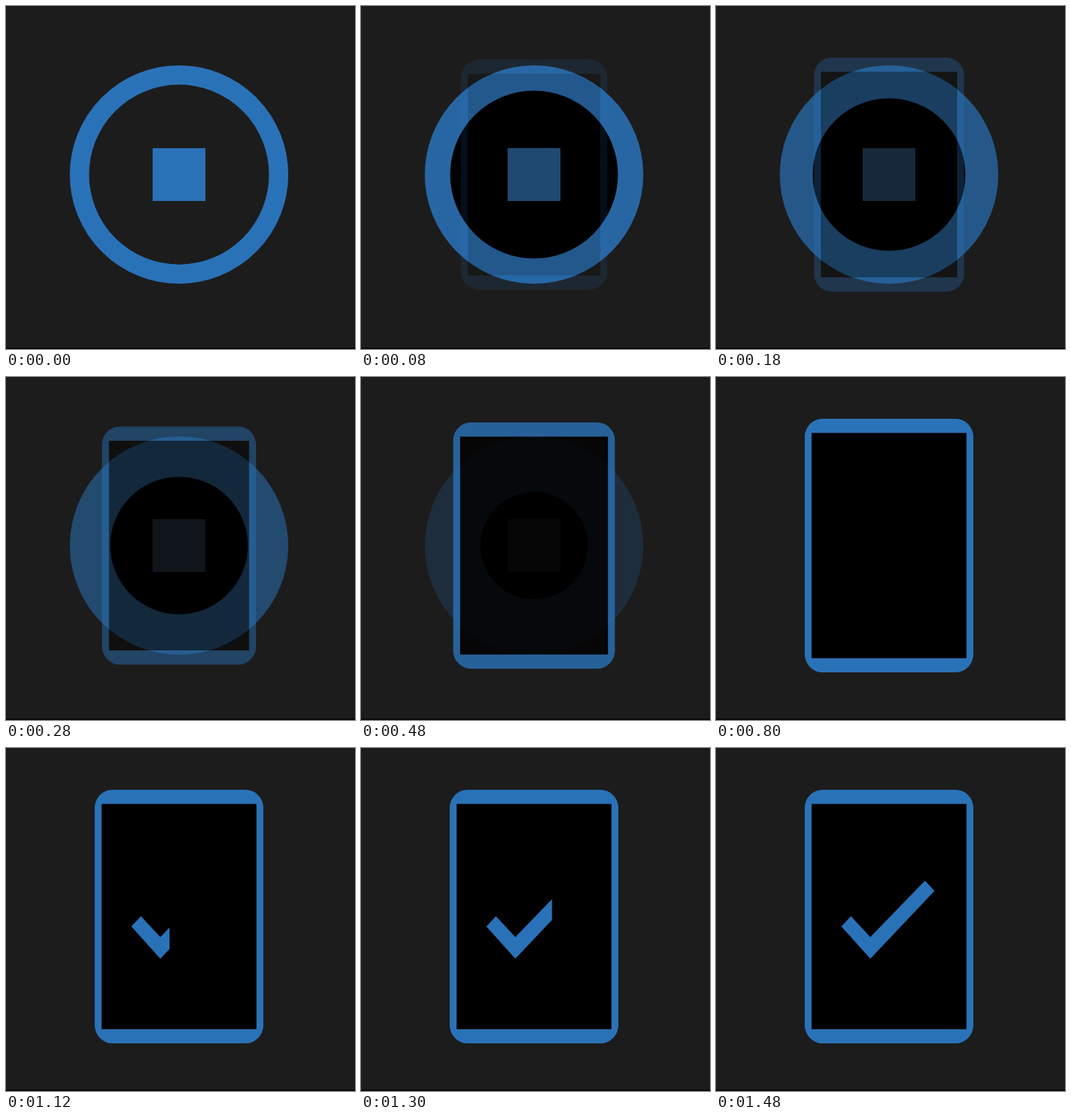
Animation of 476 by 468 pixels, one loop 1.68 s. Source, as an HTML page with a canvas:

```html
<!DOCTYPE html>
<html lang="en">
<head>
<meta charset="utf-8">
<title>Stop button to checked device</title>
<style>
  html, body { margin: 0; width: 100%; height: 100%; overflow: hidden; background: #1c1c1c; }
  canvas { display: block; }
</style>
</head>
<body>
<canvas id="stage" width="476" height="468"></canvas>
<script>
const ctx = document.getElementById('stage').getContext('2d');
const LOOP = 1680, TICK = 20, HOLD = 60;
const CX = 236, CY = 230, RADIUS = 149;
const BLUE = '#2a72b8', BACK = '#1c1c1c';
const CHECK = [[171, 243.5], [184, 229.5], [210.5, 258], [285, 181], [298, 195], [210.5, 287.5]];

// Time moves in ticks, with two longer holds.
function stepped(t) {
  const held = [80, 480].find(start => t >= start && t < start + HOLD);
  return held ?? Math.floor(t / TICK) * TICK;
}

function fillBox(w, h, color, alpha = 1) {
  ctx.globalAlpha = alpha;
  ctx.fillStyle = color;
  ctx.fillRect(CX - w / 2, CY - h / 2, w, h);
  ctx.globalAlpha = 1;
}

function drawButton(t) {
  const fade = 1 - t / 600;
  const inner = 122.7 - 0.1035 * t;
  if (t >= TICK) {
    ctx.fillStyle = '#000';
    ctx.beginPath();
    ctx.arc(CX, CY, inner + 0.5, 0, 2 * Math.PI);
    ctx.fill();
  }
  ctx.globalAlpha = fade;
  ctx.strokeStyle = BLUE;
  ctx.lineWidth = RADIUS - inner;
  ctx.beginPath();
  ctx.arc(CX, CY, (RADIUS + inner) / 2, 0, 2 * Math.PI);
  ctx.stroke();
  fillBox(72, 72, BACK);
  fillBox(72, 72, BLUE, fade ** 3);
}

function drawDevice(t) {
  const grow = Math.min(t, 660);
  const alpha = Math.min(t / 600, 1);
  const w = 195.5 + 0.0523 * grow, h = 309.5 + 0.0553 * grow;
  const innerW = w - 19.2, innerH = h - 39;
  ctx.globalAlpha = alpha;
  ctx.fillStyle = BLUE;
  ctx.beginPath();
  ctx.roundRect(CX - w / 2, CY - h / 2, w, h, 24.5);
  ctx.rect(CX - innerW / 2, CY - innerH / 2, innerW, innerH);
  ctx.fill('evenodd');
  fillBox(innerW, innerH, '#000', alpha);
}

function drawCheck(t) {
  const edge = 223 + 0.2085 * (t - 1120);
  if (edge <= 171) return;
  ctx.save();
  ctx.beginPath();
  ctx.rect(0, 0, edge, 468);
  ctx.clip();
  ctx.fillStyle = BLUE;
  ctx.beginPath();
  CHECK.forEach(([x, y]) => ctx.lineTo(x, y));
  ctx.fill();
  ctx.restore();
}

function draw() {
  const t = stepped(performance.now() % LOOP);
  ctx.fillStyle = BACK;
  ctx.fillRect(0, 0, 476, 468);
  ctx.fillStyle = '#0c0808';
  ctx.fillRect(0, 466, 476, 2);
  if (t < 540) drawButton(t);
  drawDevice(t);
  drawCheck(t);
  requestAnimationFrame(draw);
}
draw();
</script>
</body>
</html>
```
